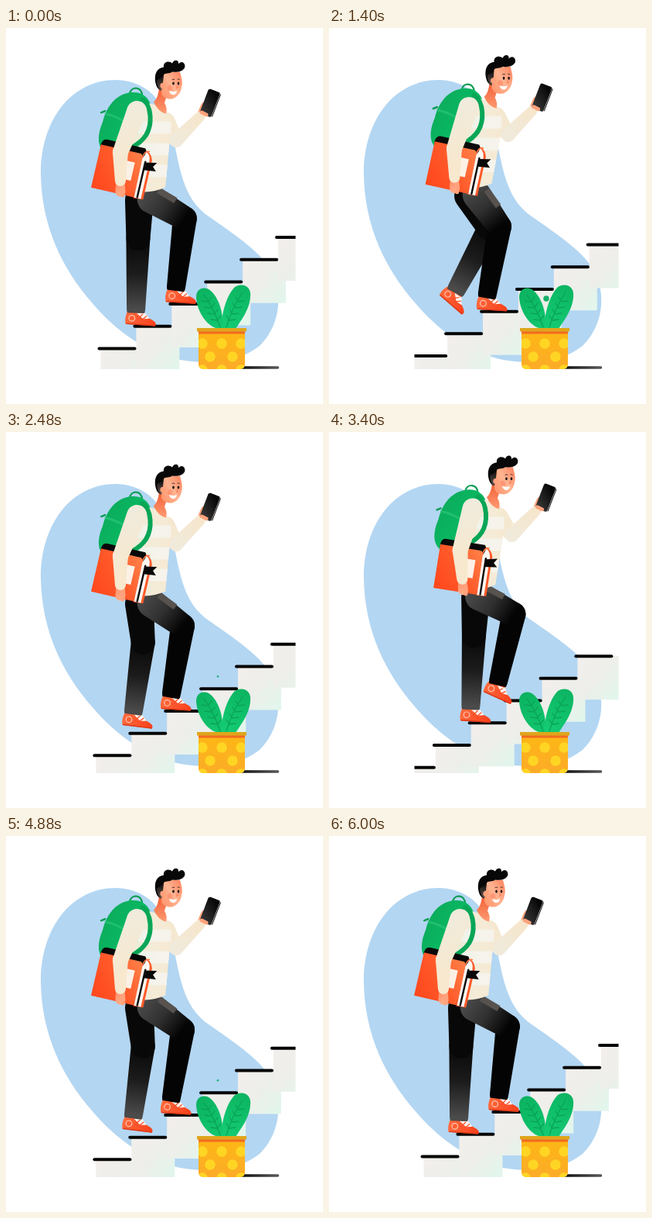
Write an HTML page with a canvas that moves like this. It is 410 by 485 pixels and loops after 6.04 s.

```html
<!DOCTYPE html>
<html lang="en">
<head>
<meta charset="utf-8">
<title>Climbing student</title>
<style>
html, body { margin: 0; width: 100%; height: 100%; overflow: hidden; background: #fff; }
canvas { display: block; width: 410px; height: 485px; }
</style>
</head>
<body>
<canvas id="stage"></canvas>
<script>
const canvas = document.getElementById('stage');
const ctx = canvas.getContext('2d');
const dpr = window.devicePixelRatio || 1;
canvas.width = 410 * dpr;
canvas.height = 485 * dpr;

const LOOP = 6040, WALK = 1200, STEP = 600;
const RUN = 45.9, RISE = 28.7;
const THIGH = 50, SHIN = 89;
const CREAM = '#f5e8d0', SKIN = '#ffa37d';
const RAD = Math.PI / 180;

const clamp = v => Math.min(1, Math.max(0, v));
const smooth = (a, b, v) => {
  const u = clamp((v - a) / (b - a));
  return u * u * (3 - 2 * u);
};

// --- drawing helpers ---
function grad(x0, y0, x1, y1, ...colors) {
  const g = ctx.createLinearGradient(x0, y0, x1, y1);
  colors.forEach((c, i) => g.addColorStop(i / (colors.length - 1), c));
  return g;
}
function shape(d, fill) {
  ctx.fillStyle = fill;
  ctx.fill(new Path2D(d));
}
function line(d, color, width) {
  ctx.strokeStyle = color;
  ctx.lineWidth = width;
  ctx.stroke(new Path2D(d));
}
function box(x, y, w, h, fill, r = 0) {
  ctx.fillStyle = fill;
  ctx.beginPath();
  ctx.roundRect(x, y, w, h, r);
  ctx.fill();
}
function dot(x, y, r, fill) {
  ctx.fillStyle = fill;
  ctx.beginPath();
  ctx.arc(x, y, r, 0, 7);
  ctx.fill();
}
function at(x, y, deg, draw) {
  ctx.save();
  ctx.translate(x, y);
  ctx.rotate(deg * RAD);
  draw();
  ctx.restore();
}
// Hull of two circles
function limb(x0, y0, r0, x1, y1, r1, fill) {
  const a = Math.atan2(y1 - y0, x1 - x0);
  const s = Math.acos((r0 - r1) / Math.hypot(x1 - x0, y1 - y0));
  ctx.fillStyle = fill;
  ctx.beginPath();
  ctx.arc(x0, y0, r0, a + s, a - s + 2 * Math.PI);
  ctx.arc(x1, y1, r1, a - s, a + s);
  ctx.fill();
}

// --- scenery ---
function blob() {
  shape('M45 188C45 118 85 67 142 67C190 68 210 105 217 145C226 190 232 222 262 243' +
    'C295 266 332 290 346 318C358 350 353 385 328 410C300 432 262 434 225 428' +
    'C180 418 142 391 110 353C74 311 46 258 45 188Z', '#b3d6f2');
}

function stairs(t) {
  const u = (t % STEP) / STEP;
  ctx.save();
  ctx.beginPath();
  ctx.rect(110.5, 240, 264, 200);
  ctx.clip();
  const steps = [];
  for (let k = -1; k < 6; k++) {
    const x = 120.5 + RUN * (k - u), y = 413.5 - RISE * (k - u);
    if (x < 360) steps.push([x, y]);
  }
  for (const [x, y] of steps)
    box(x + 2, y, 56, 56, grad(x, y, x + 56, y + 50, '#f3efec', '#eeeeea', '#e2f6ec'));
  for (const [x, y] of steps) line(`M${x} ${y}h46`, '#050505', 4);
  ctx.restore();
}

function sparks(t) {
  const spark = (born, life, x, r) => {
    const age = t < born ? life : (t - born) % 2400;
    const u = age / life;
    if (u < 1) dot(x, 355 - 0.048 * age, r * (1 - u) * clamp(8 * u), '#16b06a');
  };
  spark(800, 180, 279, 2.7);
  spark(1274, 1100, 281, 4.6);
  spark(1650, 1250, 274, 3.8);
}

function plant() {
  line('M300 438H351.5', grad(305, 0, 350, 0, '#111', '#555'), 3.5);
  shape('M276 388C262 387 247 368 246 347C246 335 258 332 266 340C276 350 282 370 280 388Z',
    grad(246, 340, 280, 388, '#0bb260', '#12c870'));
  shape('M279 388C278 370 285 345 296 334C306 328 318 333 316 347C315 364 302 380 297 388Z',
    grad(310, 335, 282, 388, '#0cb562', '#14cc74'));
  let veins = 'M256 344Q269 362 277 386M306 341Q292 362 285 386';
  for (let i = 0; i < 4; i++) {
    const y = 353 + i * 8;
    veins += `M${261 + i * 4} ${y}l-8 -1M${261 + i * 4} ${y}l5 -6`;
    veins += `M${301 - i * 4} ${y}l8 -1M${301 - i * 4} ${y}l-4 -6`;
  }
  line(veins, '#0aa357', 1.3);
  ctx.save();
  ctx.beginPath();
  ctx.roundRect(249, 390, 60, 50, [0, 0, 6, 6]);
  ctx.clip();
  box(249, 390, 60, 50, grad(0, 392, 0, 440, '#fdb715', '#fcab28'));
  for (let row = 0; row < 3; row++)
    for (let x = row % 2 ? 264 : 254; x < 310; x += row % 2 ? 29 : 25)
      dot(x, 407 + row * 17, 6.7, '#ffd524');
  box(249, 391, 60, 3.5, '#f26a22');
  ctx.restore();
  box(247, 387, 64, 4.5, '#dfa61b');
}

// --- legs ---
// The planted foot rides down with the stairs, then swings up two steps.
function footAt(p) {
  const plant = 640, u = p / STEP;
  if (p < plant) return [220 - RUN * u, 334 + RISE * u, 4];
  const s = (p - plant) / (WALK - plant);
  return [
    171 + 49 * smooth(0.36, 0.67, s),
    364.5 - 30.5 * s - 27 * Math.sin(Math.PI * s) ** 1.5,
    4 + 44 * Math.sin(Math.PI * s ** 0.75) ** 3
  ];
}
function kneeAt(hx, hy, ax, ay) {
  const dx = ax - hx, dy = ay - hy;
  const d = Math.hypot(dx, dy), m = Math.min(d, THIGH + SHIN);
  const a = (THIGH * THIGH - SHIN * SHIN + m * m) / (2 * m);
  const h = Math.sqrt(Math.max(0, THIGH * THIGH - a * a));
  return [hx + (dx * a + dy * h) / d, hy + (dy * a - dx * h) / d];
}

function shoe(x, y, deg) {
  at(x, y, deg, () => {
    shape('M-10 2C-14 10 -13 17 -12 20L26 20C30 16 22 12 16 10L10 2Z',
      grad(-12, 8, 26, 18, '#ff6a3c', '#f8401c'));
    shape('M1 5L12 4L18 11L10 12Z', '#fff4ee');
    line('M3 13L9 6M8 14L14 8', '#f8502a', 1.3);
    dot(-4.5, 12, 4.4, '#ffc9b4');
    dot(-4.5, 12, 3.2, '#ff5f34');
    line('M-11 19.5H26', '#dc3716', 1.4);
  });
}

function leg(hx, hy, p, near) {
  const [footX, ay, turn] = footAt(p);
  const ax = near ? footX : footX - 6;
  const [kx, ky] = kneeAt(hx, hy, ax, ay);
  shoe(ax, ay, turn);
  ctx.save();
  // Flat trouser cuff
  const cuff = new Path2D(), m = new DOMMatrix().translate(ax, ay)
    .rotate(Math.atan2(ay - ky, ax - kx) / RAD);
  const keep = new Path2D();
  keep.rect(-300, -150, 305, 300);
  cuff.addPath(keep, m);
  ctx.clip(cuff);
  limb(kx, ky, 15.5, ax, ay, 12, near ? '#040404' : grad(kx, ky, ax, ay, '#080808', '#1c1c1c', '#4b4b4b'));
  limb(hx, hy, 18.5, kx, ky, 15.5,
    near ? grad(hx - 8, hy - 8, kx, ky, '#484848', '#303030', '#040404') : '#080808');
  ctx.restore();
  if (near) at(hx, hy, Math.atan2(ky - hy, kx - hx) / RAD, () => box(2, -18, 26, 8, '#57524e'));
}

// --- upper body ---
function bag(x, y) {
  at(x, y, 0, () => {
    line('M-6 1C-4 -8 9 -8 10 4', '#0a9c53', 2.2);
    line('M-38 24L-43 26', '#0a9c53', 2.5);
    shape('M-4 0C18 -2 25 18 23 35C22 52 12 66 2 76C-10 84 -30 84 -40 76' +
      'C-50 66 -46 50 -41 38C-36 18 -24 2 -4 0Z', grad(-42, 20, 22, 60, '#0cab5b', '#09b761', '#07a858'));
    line('M-37 28Q-26 30 -14 37', '#1fbf70', 3);
  });
}

function torso(hx, hy, bx, by, wx, wy) {
  ctx.save();
  ctx.clip(new Path2D(`M${bx + 8} ${by + 12}L${hx - 16} ${hy + 29}Q${hx - 8} ${hy + 40} ${hx - 2} ${hy + 38}` +
    `C${hx + 5} ${hy + 52} ${hx + 3} ${hy + 66} ${hx} ${hy + 82}` +
    `L${wx + 23} ${wy - 4}Q${wx} ${wy + 6} ${wx - 25} ${wy - 1}` +
    `L${bx - 6} ${by + 50}Q${bx - 8} ${by + 18} ${bx + 8} ${by + 12}Z`));
  box(100, 60, 170, 170, CREAM);
  for (let k = 50; k < 110; k += 28) box(100, hy + k, 170, 16, '#f6f2ea');
  box(100, 60, 170, 170, grad(bx - 10, 0, hx + 6, 0, 'rgba(214,238,220,.5)', 'rgba(255,255,255,0)'));
  ctx.restore();
}

function head(x, y, smile) {
  at(x, y, 0, () => {
    shape('M-13 6L-3 17L-6 26Q-2 33 -4 40Q-14 38 -20 25Q-14 20 -13 6Z',
      grad(0, 12, 0, 40, '#f3683f', '#ff9a72'));
    shape('M-10 -14L14 -14C16 -6 18 0 16 6C15 14 9 21 2 21C-4 21 -8 19 -10 14Z',
      grad(-10, 10, 16, -6, '#ff9a72', '#ffb592', '#ff8d69'));
    dot(1, 7, 3.5, 'rgba(255,112,80,.35)');
    shape('M-18 -2C-19 -11 -16 -19 -7 -20C-8 -27 0 -29 4 -25C7 -31 13 -29 12 -24' +
      'C17 -30 22 -24 20 -19C17 -14 9 -13 4 -14C0 -11 -5 -13 -7 -10L-8 0L-9 0L-10 10C-15 9 -17 4 -18 -2Z', '#080808');
    shape('M-16 -3L-8 -8L-8 0L-10 10Q-15 8 -16 -3Z', grad(0, -8, 0, 11, '#111', '#6a5a52'));
    dot(-8, 4, 3.6, '#ffa27c');
    at(5.5, 1, 0, () => shape('M-1.3 0a1.3 2 0 1 0 2.6 0a1.3 2 0 1 0 -2.6 0', '#181010'));
    at(12, 1, 0, () => shape('M-1.3 0a1.3 2 0 1 0 2.6 0a1.3 2 0 1 0 -2.6 0', '#181010'));
    line('M4 -4Q5.5 -5 7 -4M11 -4.5Q12.5 -5 13.5 -4', '#3a201a', 0.9);
    line('M10 4Q13 6 9.5 7', '#f4663e', 1);
    ctx.translate(4, 10.5);
    ctx.scale(1, smile);
    shape('M-4 0Q2 2 6 0Q5 6 0 5Q-3 4 -4 0Z', '#fff');
    ctx.scale(1, smile > 0 ? 1 / smile : 1);
  });
  if (!smile) line(`M${x + 6} ${y + 13}h4`, '#d9522c', 1);
}

function book(x, y, deg) {
  at(x, y, deg, () => {
    shape('M54 -6Q66 -6 69 6L69 57L56 58Z', '#ff5a2a');
    shape('M56 -4Q65 -4 66 7L66 57L57 57Z', '#fbf7f1');
    line('M61 9V56', '#0a0a0a', 2.4);
    shape('M0 -1Q1 -8 7 -8L57 -8Q61 -5 57 4L0 4Z', '#090909');
    shape('M0 0H53Q56 1 56 4V57H0Z', grad(0, 50, 58, 4, '#ff481d', '#ff5a2a', '#ff8249'));
    line('M56 4Q57 -5 63 -5', '#ff7a48', 1.6);
    box(28, 13, 20, 24, '#fdf1e6');
    shape('M61 10L76 7L72 13L77 18L61 20Z', '#080808');
  });
}

function farArm(hx, hy, px, py) {
  const fx = px - 44, fy = py + 48, wx = px - 13, wy = py + 17;
  limb(wx, wy, 5, px - 8, py + 3, 4, SKIN);
  limb(hx - 5, hy + 51, 13, fx, fy, 9, CREAM);
  limb(fx, fy, 9, wx, wy, 6.5, grad(fx, fy, wx, wy, '#f0eadb', '#f6e6cc'));
  at(px, py, 21, () => {
    box(-7, -17, 16, 34, '#eee7e2', 2.5);
    box(-8.5, -17, 16, 34, grad(-8, 10, 8, -10, '#333', '#050505'), 2.5);
    line('M8.5 -15V15', '#111', 1);
  });
  limb(px - 11, py + 12, 2.4, px - 5, py + 15, 2.4, SKIN);
}

function nearArm(sx, sy, ex, ey, wx, wy) {
  const d = Math.hypot(wx - ex, wy - ey);
  const ux = (wx - ex) / d, uy = (wy - ey) / d;
  limb(wx, wy, 5.5, wx + ux * 14, wy + uy * 14, 6.5, grad(wx, wy, wx + 10, wy + 14, '#ff9069', '#ffb08d'));
  limb(wx + ux * 10 + 3, wy + uy * 10, 3, wx + ux * 19 + 3, wy + uy * 19, 2.6, SKIN);
  const cloth = grad(sx - 14, sy, sx + 14, ey, '#f0ebdc', '#f7e8ce');
  limb(sx, sy, 13, ex, ey, 10, cloth);
  limb(ex, ey, 10, wx, wy, 7, cloth);
}

function person(t) {
  const p = t % WALK;
  const w = 2 * Math.PI * (p - 40) / WALK;
  const swing = Math.cos(w), bob = Math.cos(2 * w), sway = Math.cos(3 * w);
  const fore = (1 - swing) / 2;      // 0 arm back, 1 arm forward
  const raise = fore ** 2.5;

  const bx = 177 - 3.7 * swing - 4.9 * bob - 3.4 * sway, by = 78.5 + 5 * bob;
  const hx = bx + 43 + 2 * bob, hy = by - 14 + 1.5 * bob;
  const wx = bx + 13.4 + 4.5 * sway, wy = by + 126.5;
  const px = bx + 98, py = by + 12 + 2 * bob;

  const sx = bx + 3, sy = by + 24;
  const upper = (14 + 8 * swing) * RAD, lower = 60 * raise * RAD;
  const upperLen = 57 - 10 * raise, lowerLen = 37 + 6 * raise;
  const ex = sx - upperLen * Math.sin(upper), ey = sy + upperLen * Math.cos(upper);
  const rx = ex + lowerLen * Math.sin(lower), ry = ey + lowerLen * Math.cos(lower);

  // The book hangs from the wrist
  const tilt = 13 - 57 * raise, c = Math.cos(tilt * RAD), s = Math.sin(tilt * RAD);
  const kx = rx - 35 * c + 40 * s, ky = ry - 35 * s - 40 * c;

  leg(wx + 1 - 12 * swing, wy + 12, (p + STEP) % WALK, false);
  leg(wx + 1 + 4 * swing, wy + 11, p, true);
  bag(bx, by);
  farArm(hx, hy, px, py);
  torso(hx, hy, bx, by, wx, wy);
  head(hx, hy, clamp(12 * (0.93 - fore)));
  line(`M${bx + 10} ${by + 9}C${bx + 23} ${by + 18} ${bx + 23} ${by + 42} ${bx + 15} ${by + 55}` +
    `Q${bx + 9} ${by + 64} ${bx - 2} ${by + 70}`, '#08a657', 6);
  book(kx, ky, tilt);
  nearArm(sx, sy, ex, ey, rx, ry);
}

function frame(t) {
  ctx.setTransform(dpr, 0, 0, dpr, 0, 0);
  ctx.lineCap = 'round';
  ctx.lineJoin = 'round';
  box(0, 0, 410, 485, '#fff');
  blob();
  stairs(t);
  sparks(t);
  person(t);
  plant();
}

const start = performance.now();
function tick() {
  // 25 pictures per second
  frame(Math.floor((performance.now() - start) / 40) * 40 % LOOP);
  requestAnimationFrame(tick);
}
tick();
</script>
</body>
</html>
```
